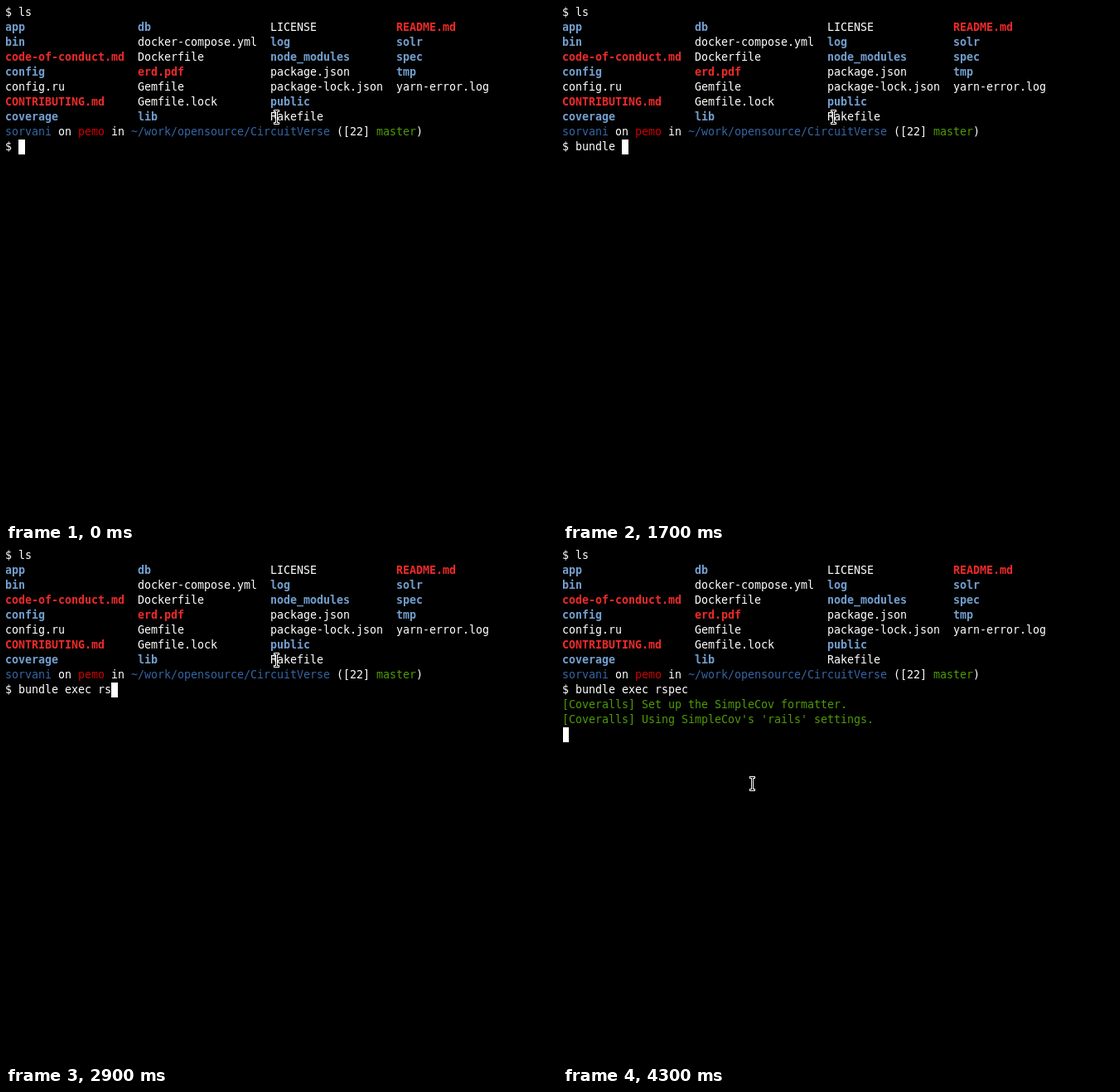
An HTML page with a canvas for the animation above (8000 ms loop, 665x621 px).

```html
<!DOCTYPE html>
<html lang="en">
<head>
<meta charset="utf-8">
<title>Terminal</title>
<style>
html, body { margin: 0; width: 100%; height: 100%; overflow: hidden; background: #000; }
canvas { display: block; }
</style>
</head>
<body>
<canvas id="stage" width="665" height="621"></canvas>
<script>
const ctx = document.getElementById('stage').getContext('2d');
const LOOP = 8000, CELL = 8, ROW = 18;
const FONT = '13.333px "DejaVu Sans Mono", monospace';
const WHITE = '#fff', BLUE = '#3465a4', RED = '#cc0000', GREEN = '#4e9a06';
const DIR = '#729fcf', DOC = '#ef2929';

// Directory listing: "/" marks a folder, "!" a highlighted document.
const columns = [
  [0, '/app /bin !code-of-conduct.md /config config.ru !CONTRIBUTING.md /coverage'],
  [20, '/db docker-compose.yml Dockerfile !erd.pdf Gemfile Gemfile.lock /lib'],
  [40, 'LICENSE /log /node_modules package.json package-lock.json /public Rakefile'],
  [59, '!README.md /solr /spec /tmp yarn-error.log']
];
const prompt = [
  ['sorvani', BLUE], [' on '], ['pemo', RED], [' in '],
  ['~/work/opensource/CircuitVerse', BLUE], [' ([22] '], ['master', GREEN], [')']
];
const command = 'bundle exec rspec';
const keyTimes = [300, 500, 600, 1100, 1500, 1600, 1700, 1900, 2100,
  2300, 2400, 2600, 2700, 2900, 3000, 3100, 3300];
const ENTER = 3400, OUTPUT = 4100;
const output = [
  '[Coveralls] Set up the SimpleCov formatter.',
  "[Coveralls] Using SimpleCov's 'rails' settings."
];
// Pointer: time, x, y of its centre
const pointerPath = [[0, 326, 134], [3900, 326, 153], [4000, 311, 186],
  [4100, 281, 224], [4200, 249, 261], [4300, 228, 283]];

function write(text, col, row, color = WHITE, bold = false) {
  ctx.font = (bold ? 'bold ' : '') + FONT;
  ctx.fillStyle = color;
  [...text].forEach((ch, i) => ctx.fillText(ch, (col + i) * CELL - 1, row * ROW + 12));
}

function box(x, y, w, h, color) {
  ctx.fillStyle = color;
  ctx.fillRect(x, y, w, h);
}

function drawListing() {
  write('$ ls', 0, 0);
  for (const [col, names] of columns) {
    names.split(' ').forEach((name, i) => {
      const color = { '/': DIR, '!': DOC }[name[0]];
      write(color ? name.slice(1) : name, col, i + 1, color, !!color);
    });
  }
  let col = 0;
  for (const [text, color] of prompt) {
    write(text, col, 8, color);
    col += text.length;
  }
}

function drawPointer(t) {
  const [, x, y] = pointerPath.filter(p => p[0] <= t).pop();
  box(x - 3, y - 9, 7, 3, WHITE);
  box(x - 3, y + 6, 7, 3, WHITE);
  box(x - 1, y - 7, 3, 14, WHITE);
  box(x - 2, y - 8, 5, 1, '#000');
  box(x - 2, y + 7, 5, 1, '#000');
  box(x, y - 7, 1, 14, '#000');
}

function draw(now) {
  const t = now % LOOP;
  box(0, 0, 665, 621, '#000');
  drawListing();

  const typed = keyTimes.filter(k => k <= t).length;
  write('$ ' + command.slice(0, typed), 0, 9);
  let col = typed + 2, row = 9;
  if (t >= ENTER) [col, row] = [0, 10];
  if (t >= OUTPUT) {
    output.forEach((line, i) => write(line, 0, 10 + i, GREEN));
    row = 12;
  }
  box(col * CELL - 1, row * ROW - 1, CELL, ROW, WHITE);
  drawPointer(t);
  requestAnimationFrame(draw);
}
requestAnimationFrame(draw);
</script>
</body>
</html>
```
